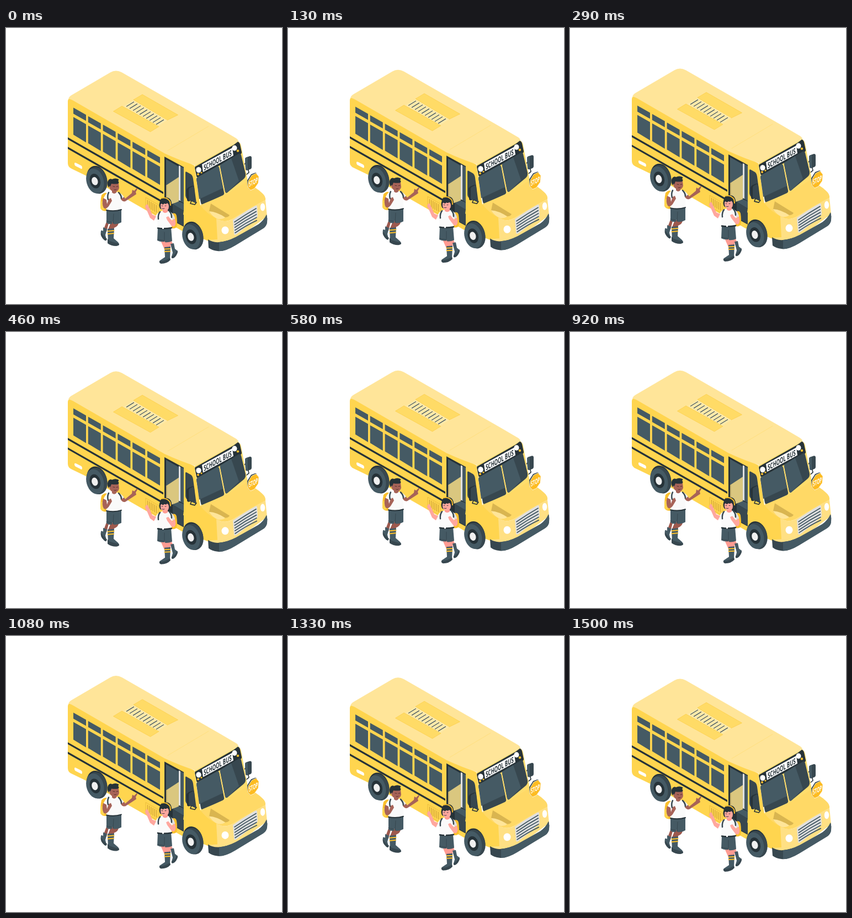
An HTML page that plays this animation: 500 by 500 pixels, repeating every 1.54 s.

```html
<!DOCTYPE html>
<html lang="en">
<head>
<meta charset="utf-8">
<title>School bus</title>
<style>
  html, body { margin: 0; height: 100%; overflow: hidden; background: #fff; }
  svg { display: block; width: 100%; height: 100%; }
  text { font-family: "Open Sans", sans-serif; font-weight: 700; }
  .dark { fill: #37474f; }
  .slate { fill: #455a64; }
  .ink { fill: #263238; }
  .sun { fill: #ffd54f; }
  .gold { fill: #fbc02d; }
  .white { fill: #fff; }
  .shade { fill: #e0e0e0; }
  .line { fill: none; stroke-linecap: round; stroke-linejoin: round; }
</style>
</head>
<body>
<svg viewBox="0 0 500 500">
  <defs>
    <g id="wheel">
      <ellipse class="ink" cx="3" cy="-1" rx="18" ry="25" transform="rotate(-16)"/>
      <ellipse class="dark" cx="3" cy="1" rx="18" ry="24.5" transform="rotate(-16)"/>
      <ellipse class="slate" cx="-1" cy="1" rx="15.5" ry="23" transform="rotate(-16)"/>
      <ellipse class="ink" cx="-1" cy="1" rx="9.5" ry="13.5" transform="rotate(-16)"/>
      <ellipse cx="-1.5" cy="1" rx="5.5" ry="7.5" fill="#f0f0f0" transform="rotate(-16)"/>
    </g>
  </defs>
  <g id="scene">
    <!-- far mirror -->
    <path class="line" d="M438 252l2 10-5 4M432 247l5-6" stroke="#263238" stroke-width="1.6"/>
    <path class="dark" d="M433 237q0-2 3-3l6-2q3 0 3 3v17q0 3-3 4l-5 2q-3 0-3-3z"/>
    <path class="slate" d="M433 237q0-2 3-3l2 1v22q-4 1-4-2z"/>

    <!-- body -->
    <path class="sun" d="M112 133q0-6 6-5L290 224 341 249 352 322 385 346 386 396 367 386 318 367 182 289 146 268 119 255q-7-3-7-10z"/>
    <path fill="#ffe599" d="M113 128.500q1-4 6-7L189 80.500q10-6 21 0L385 181l29 17q8 4 7 9l-78 42q-28-9-56-22L121 131q-5-3-8-2.500z"/>
    <path class="line" d="M367 178l-74 44" stroke="#ffdd78" stroke-width=".8"/>

    <!-- roof hatch -->
    <g fill="#ffdb66" stroke="#fdcd45" stroke-width=".7">
      <path d="M194.500 151l15.500-9.500 67 37-15.500 9.500z"/>
      <path d="M231 130l16-9.500 64.500 37-19.500 9.500z"/>
    </g>
    <path fill="#ffe9a9" d="M213 141.500l18-10.500 61 36-16 10.500z"/>
    <g id="slats" class="line" stroke="#455a64" stroke-width="1.3"></g>

    <!-- side -->
    <g id="windows" class="slate"></g>
    <path class="ink" d="M112 198l173 99v3.700L112 201.700zM112 215.300l173 98.700v3.700L112 219z"/>
    <path class="white" d="M124 245.500q0-2.500 3-1l9 4.500q2 1 2 4t-2 2l-9-4.500q-3-1-3-5z"/>
    <path class="sun" d="M253 307l23 13v20l-23-13z" stroke="#e8b838" stroke-width=".8"/>
    <g id="vents" class="line" stroke="#cfa136" stroke-width="1.200"></g>

    <!-- door -->
    <path class="ink" d="M287 233l35 19v108l-35-19z"/>
    <path class="slate" d="M290 238l23 13v20l-23 14z"/>
    <path fill="#dac77f" d="M290 285l23-15v45l-23 7z"/>
    <path fill="#c3af6c" d="M290 285l2-1v39l-2-1z"/>
    <path class="slate" d="M302 319l11-5 9 4v13z"/>
    <path class="dark" d="M302 319l20 12v28l-20-11z"/>
    <path class="shade" d="M313 249l3 1.500v63l-3-1.500z"/>
    <path class="slate" d="M316 250.500l6 3v64l-6-4z"/>
    <path class="dark" d="M325 262q0-3 3-1l7 4q3 2 4 8l6 45-15-7q-5-3-5-8z"/>

    <!-- front panel -->
    <path fill="#ffdd6d" d="M341 250l80-44q4 2 5 8l12 64q1 5 3 8l-87 36z"/>
    <path class="ink" d="M342 253q0-2 3-3l67-38 8-6q3 1 4 5l3 14q0 3-3 4l-76 41q-3 1-3-2z"/>
    <path class="white" d="M355 247l55-30 2 14-55 30z"/>
    <text class="ink" font-size="13" transform="matrix(.61 -.335 .05 1.080 358.500 258.500)">SCHOOL BUS</text>
    <g class="white">
      <ellipse cx="349" cy="257" rx="4.700" ry="5.200"/>
      <ellipse cx="414" cy="217.500" rx="4.500" ry="5"/>
    </g>
    <g class="gold">
      <circle cx="348" cy="265" r="2"/><circle cx="354" cy="262" r="1.600"/>
      <circle cx="420" cy="222.500" r="2.200"/>
    </g>
    <path class="dark" d="M345 274q0-3 3-4l34-19q3-1 4 2l9 45q1 3-2 5l-35 16q-4 2-5-2zM388 251q-1-2 2-4l31-19q4-2 5 2l8 34q1 6-4 10l-29 24q-3 2-4-2z"/>
    <path class="slate" d="M345 274q0-3 3-4l34-19q3-1 4 2l7 37-43 20zM388 251q-1-2 2-4l18-11 14 41-21 21q-3 2-4-2z"/>

    <!-- hood -->
    <path class="sun" d="M352 321l30 22 4 48-19-7-7-16q-6-16-20-22l-19-8 2-15z"/>
    <path fill="#ffd966" d="M352 321q1-1 46-19l36-22q20 9 30 19 7 6 6 13-28 14-58 33-16 10-31 0-18-9-29-24z"/>
    <path fill="#ffe084" d="M381 345q16 10 31 0 30-20 58-33l3 29-32 24q-36 24-56 24-12 0-18-5l16-1z"/>
    <path fill="#d9b550" d="M371 318l34 21q-2 4-8 4-17-3-29-11z"/>
    <path fill="#ffe599" d="M368 332q14 1 29 11-5 4-13 3-10-4-16-14z"/>
    <path class="shade" d="M411 348q18-13 41-26 3-1 3 2l1 16q0 3-3 5-18 16-36 29-4 2-4-2z"/>
    <g id="grille" class="line" stroke="#455a64" stroke-width="1.800"></g>
    <ellipse class="white" cx="397" cy="366.500" rx="6.500" ry="7"/>
    <ellipse class="white" cx="465" cy="324.500" rx="4.200" ry="7"/>
    <path class="dark" d="M366 383q9 6 20 5 14-1 30-9l41-23q10-7 15-18 2 7 1 14-1 7-7 11l-51 31q-20 12-32 10-10-1-16-6z"/>
    <path class="slate" d="M386 388q14-1 30-9l41-23q10-7 15-18 2 7 1 14-1 7-7 11l-51 31q-16 10-29 10z"/>

    <!-- near mirror -->
    <path class="line" d="M337 310l-3 8 8 2 3-4" stroke="#263238" stroke-width="1.600"/>
    <path class="ink" d="M327 294q0-3 3-5l7-3q3-1 4 2l1 20q0 3-3 4l-8 2q-3 0-3-3z"/>
    <path class="dark" d="M331 293q0-3 3-4l4-2q3-1 3 2l1 19q0 3-3 4l-5 1q-3 0-3-3z"/>

    <use href="#wheel" x="162" y="276"/>
    <use href="#wheel" x="336" y="377"/>

    <!-- stop sign -->
    <path class="dark" d="M437 276l7-11 8-3 2 1-12 30-4-5z"/>
    <path d="M439 277l6-10 8-4 5 6-1 12-7 10-7 3-5-6z" fill="#fdbc22" stroke="#fff" stroke-width=".7"/>
    <text class="white" font-size="12" transform="matrix(.54 -.28 0 1.080 440 288)">STOP</text>

    <!-- boy -->
    <g id="boy">
      <path class="gold" d="M173 303q5-6 10-4v32q-7 2-11-3-2-12 1-25z"/>
      <path class="sun" d="M171 315q3-2 7 0v15q-7-1-7-4z"/>
      <path d="M187 350l-5 19-6-2 6-16zM190 352h14q0 7-8 10l-2 5h-10z" fill="#9d594e"/>
      <path class="slate" d="M176 361l7 3-3 11 2 8q0 4-4 1-8-9-6-17 2-1 4 1z"/>
      <path class="dark" d="M172 370q5 8 11 12-1 5-5 2-8-7-6-14z"/>
      <path class="slate" d="M184 364l12-1-1 18 8 7q2 2 2 5-10 3-20-3z"/>
      <path class="dark" d="M184 382l4 4q8 3 16 4 3 4-4 5-10 0-16-5z"/>
      <path class="line" d="M184.500 368l11-1M184.500 373l10.500-1" stroke="#fbc02d" stroke-width="2"/>
      <path class="slate" d="M182 328h27v24q-8 4-14 3l-3-4v4q-6 1-10-2z"/>
      <path class="line" d="M195 337l-1 17M182 350l10 2" stroke="#37474f" stroke-width="1"/>
      <path fill="#fafafa" d="M184 298q11-3 21 0 8 5 10 11l-6 4v16q-14 4-27 1l-1-16-5-3q2-8 8-13z"/>
      <path class="shade" d="M207 300q5 4 7 9l-5 3z"/>
      <path class="line" d="M182 330q14 3 27-1" stroke="#263238" stroke-width="2"/>
      <path class="line" d="M186 298q-3 6-1 13M204 298q5 5 5 11" stroke="#37474f" stroke-width="2.500"/>
      <path d="M176 308l6 3 1 8 3-9 4-2 2 5-6 10q-5 6-9 3-4-7-1-18zM208 310l6-4 2 3 12-10 1-6 3 2 5-5 1 2-3 5 1 4-6 4-14 9q-5 1-8-4zM192 293h8v5q-4 4-8 0z" fill="#a76358"/>
      <path d="M187 281q9-5 17 0l1 9q-2 7-8 7-8-1-10-9z" fill="#a76358"/>
      <path class="ink" d="M185 288q-3-8 1-13 3-3 6-1 6-3 12 0 1 2-1 3 3 3 0 5-6 1-12 0l-2 5-2-1-1 3z"/>
      <path class="line" d="M194 287l3 .5M200 287.500l3-.5M196 293q2 1 4-.5" stroke="#4e2d2a" stroke-width=".9"/>
    </g>

    <!-- girl -->
    <g id="girl">
      <path class="gold" d="M299 337q8-4 10 3 2 13 0 21-5 4-10 1z"/>
      <path d="M280 385l20-1-2 13-4 4h-7zM299 384l5 11-5 3z" fill="#ff9b92"/>
      <path class="slate" d="M298 391l6-1 2 10 5 4q-2 9-8 13-3 1-3-3l2-7z"/>
      <path class="dark" d="M310 403q2 2 0 6-3 7-8 8-3 0-2-3 7-4 10-11z"/>
      <path class="slate" d="M287 397l11-1-1 24q-8 7-17 5-3-2-1-4l9-6z"/>
      <path class="dark" d="M278 422q10 1 19-6l1 4q-6 7-17 7-4-1-3-5z"/>
      <path class="line" d="M287.500 400.500l10-.5M287.500 405l10-.5" stroke="#fbc02d" stroke-width="2"/>
      <path class="slate" d="M275 361h24l2 25q-7 3-13 2l-1-4v3q-7 1-13-2z"/>
      <path class="line" d="M287 370v16M275 383l11 2" stroke="#37474f" stroke-width="1"/>
      <path fill="#fafafa" d="M278 333q8-4 18-1 9 5 10 14l-6 3v13q-13 3-25 0l-1-13-5-2q2-10 9-14z"/>
      <path class="shade" d="M299 334q6 4 7 12l-5 2z"/>
      <path class="line" d="M275 362.500q12 2 25-.5" stroke="#263238" stroke-width="2.600"/>
      <path class="white" d="M283 361.500h3v2.500h-3z"/>
      <path class="line" d="M279 333q-4 5-3 13M296 332q4 4 4 11" stroke="#37474f" stroke-width="2.500"/>
      <path d="M272 341l-4 8-7-5-6-14-3-5 1-4 3-2 4 8 5 11zM306 346q3 9-1 13-4 2-7-3l-6-8-2-5 4-2 4 5 4 4 1-4z" fill="#ffa79e"/>
      <path class="ink" d="M279 314q1-7 9-7 10-1 12 9 1 6-1 11-4 3-8 2-7 2-12-2-3-6 0-13z"/>
      <path d="M284 327h9v6q-5 4-9 0z" fill="#ff9b92"/>
      <path d="M280 317h14l1 6q0 8-7 8-7 0-8-7z" fill="#ffa79e"/>
      <path class="ink" d="M279 320q-1-7 4-9 8-2 12 2 2 4 1 8l-2-2-2-2-2 2-3-1-3 2-2-2z"/>
      <path class="line" d="M282 308q9-2 15 6 1 3 1 7" stroke="#fbc02d" stroke-width="2"/>
      <path class="line" d="M282 322l2 .3M288 322.300l2-.3M283 327q2 1 4 0" stroke="#263238" stroke-width=".9"/>
    </g>
  </g>
</svg>
<script>
  const PERIOD = 1500, LOOP = 1540, LIFT = 10;
  const byId = id => document.getElementById(id);
  const repeat = (id, count, path) => {
    const d = Array.from({ length: count }, (_, i) => path(i)).join('');
    byId(id).innerHTML = `<path d="${d}"/>`;
  };

  repeat('windows', 6, i =>
    `M${122 + 26.8 * i} ${144.3 + 15.4 * i}l23 13v11l-23-13zm0 17l23 13v33l-23-14z`);
  repeat('slats', 10, i => `M${218.5 + 6 * i} ${142 + 3.6 * i}l13-8`);
  repeat('vents', 6, i => `M${256.5 + 3.2 * i} ${312 + 1.8 * i}v13`);
  repeat('grille', 5, i => `M${414 + i * .3} ${351.5 + i * 4.9}q19-13 39-${24.5 - i * .5}`);

  const scene = byId('scene');
  function draw(now) {
    const t = Math.min(now % LOOP, PERIOD);
    const lift = LIFT * (1 - Math.abs(1 - 2 * t / PERIOD));
    scene.setAttribute('transform', `translate(0 ${-lift})`);
    requestAnimationFrame(() => draw(performance.now()));
  }
  draw(performance.now());
</script>
</body>
</html>
```
